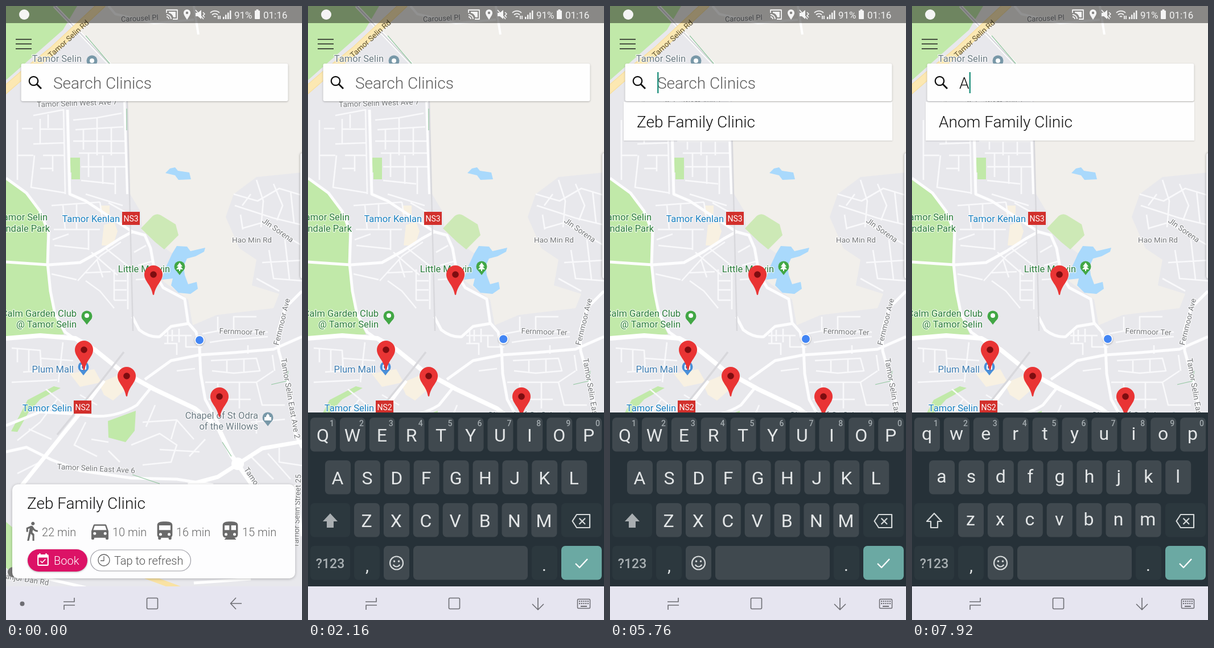
Recreate the animation shown at these times as an HTML page with a canvas. Size 520 by 1077 pixels, loop 8000 ms.

```html
<!DOCTYPE html>
<html lang="en">
<head>
<meta charset="utf-8">
<title>Clinic search</title>
<style>
html, body { margin: 0; width: 100%; height: 100%; overflow: hidden; background: #e8e8ec; }
canvas { display: block; width: 520px; height: 1077px; }
</style>
</head>
<body>
<canvas id="stage"></canvas>
<script>
const W = 520, H = 1077, LOOP = 8000, STEP = 80;
const canvas = document.getElementById('stage');
const dpr = window.devicePixelRatio || 1;
canvas.width = W * dpr;
canvas.height = H * dpr;
const c = canvas.getContext('2d');

const CLINICS = ['Zeb Family Clinic', 'Boka Clinic', 'Anom Family Clinic', 'Ono Peak Medical'];
const FOCUS = 600;
const EDITS = [
  [2960, 'A'], [3840, ''], [4240, 'Z'], [4560, 'Ze'], [4800, 'Zeb'],
  [5200, 'Ze'], [5400, 'Z'], [5600, ''], [6160, 'A'], [6480, 'An'],
  [6800, 'Ano'], [7040, 'Anom'], [7440, 'Ano'], [7680, 'An'], [7840, 'A']
];

// ---------- helpers ----------
function fill(d, color, rule) {
  c.fillStyle = color;
  c.fill(new Path2D(d), rule || 'nonzero');
}
function line(d, color, width) {
  c.strokeStyle = color;
  c.lineWidth = width;
  c.stroke(new Path2D(d));
}
function box(x, y, w, h, r, color) {
  c.beginPath();
  c.roundRect(x, y, w, h, r);
  c.fillStyle = color;
  c.fill();
}
function frame(x, y, w, h, r, color, width) {
  c.beginPath();
  c.roundRect(x, y, w, h, r);
  c.strokeStyle = color;
  c.lineWidth = width;
  c.stroke();
}
function disc(x, y, r, color) {
  c.beginPath();
  c.arc(x, y, r, 0, 7);
  c.fillStyle = color;
  c.fill();
}
function ring(x, y, r, color, width) {
  c.beginPath();
  c.arc(x, y, r, 0, 7);
  c.strokeStyle = color;
  c.lineWidth = width;
  c.stroke();
}
function text(s, x, y, size, color, opt = {}) {
  c.save();
  c.translate(x, y);
  c.rotate((opt.turn || 0) * Math.PI / 180);
  c.font = `${opt.weight || 400} ${size}px Roboto, sans-serif`;
  c.textAlign = opt.align || 'left';
  if (opt.halo) {
    c.strokeStyle = 'rgba(255,255,255,.75)';
    c.lineWidth = 2.5;
    c.strokeText(s, 0, 0);
  }
  c.fillStyle = color;
  c.fillText(s, 0, 0);
  c.restore();
}
const light = (s, x, y, size, color) => text(s, x, y, size, color, { weight: 300 });
function at(x, y, scale, draw) {
  c.save();
  c.translate(x, y);
  c.scale(scale, scale);
  draw();
  c.restore();
}
// 24-unit icon centred on x, y
const icon = (d, x, y, scale, color) =>
  at(x, y, scale, () => { c.translate(-12, -12); fill(d, color, 'evenodd'); });
function shadow(blur, dy, alpha, draw) {
  c.save();
  c.shadowColor = `rgba(0,0,0,${alpha})`;
  c.shadowBlur = blur * dpr;
  c.shadowOffsetY = dy * dpr;
  draw();
  c.restore();
}

// ---------- map ----------
const GREEN = '#c1e9a9', WATER = '#a9d9fc', CREAM = '#f8f1e2', RAIL = '#d8d8dc';

function land() {
  box(0, 0, W, H, 0, '#e8e8ec');
  fill('M85 0H520V292L440 300 400 330 386 370 410 425 440 445 432 490 480 505 470 530 370 542 328 560 320 515 275 482 300 440 280 425 240 395 236 360 218 330 213 168 185 104Z', '#f1efeb');
  fill('M0 0H125L100 42 0 130Z', GREEN);
  fill('M0 304L26 320 56 355 72 395 71 450 78 500 84 540 102 576 0 580Z', GREEN);
  fill('M237 390L258 368Q265 363 272 367L298 383 303 402 278 427 262 414Z', '#cde9b6');
  fill('M113 266H130V304H115V292H113ZM179 728L228 710 226 745 210 765 180 757Z', GREEN);
  fill('M38 691L84 667 96 670 60 690 40 712 20 747 9 746ZM0 905L12 915V995L0 985Z', GREEN);
  fill('M280 293L288 285 297 283 302 289 322 292 325 304 303 305 297 297Z', WATER);
  fill('M274 480L279 462 292 434 300 421 318 422 324 430 350 424 348 431 333 439 318 443 312 456 314 472 320 488 335 484 337 496 324 505 303 503 290 490 293 478Z', WATER);
  fill('M172 384L190 378 196 395 188 420 168 420ZM112 645L155 637 168 660 130 668ZM163 662L196 648 211 672 188 692 172 682ZM165 350H182V365H165Z', CREAM);
}

function streets() {
  const small = [
    'M48 192L101 182 104 330M60 198V242M60 216H100M48 242L103 240M74 190V214M65 262H102M82 262V290M50 262L44 318 105 328M20 200V305M20 262H48M60 285H82M28 215H47',
    'M118 200L160 196 203 188M122 217L206 212M118 237H210M160 196V262M136 217V252M185 212V262M128 258H212M145 258V300M170 262V312M132 282H210M132 306L190 312M192 282V330M140 330L205 350',
    'M80 350L165 344M100 350L104 392M84 392H165M124 348V392M145 392V428M85 420L145 426M165 344L170 378M180 345L210 362M82 410L110 400',
    'M126 482L166 438 202 414M150 432L196 472M138 468L184 466M160 445L170 476M176 426L214 456V532M190 462V516M190 482H212M190 498H212M190 516H212M140 482L165 500 190 530M225 432L246 420M232 455L256 448M228 480L262 478M80 470L124 480',
    'M400 330L442 342 480 320 520 332M402 350L470 372 520 384M440 305L452 342 448 388M470 312L486 350 476 376M415 390L450 380 520 420M412 366L416 392M500 325L506 380M430 330L415 350M450 450L520 446M462 428L470 478 520 482M490 410L498 480M440 478L480 500',
    'M278 578H326M284 570V592M292 568V588M304 566V590M278 592H300V612M316 578V598H345M345 575L372 570 460 572M372 570V545M400 572V545H440M358 590L384 586 460 580M425 595V610M300 640L332 636M360 622L440 618 446 640 400 644 362 640M388 620V642M418 618V643M350 660H440L470 640M372 662V690M410 660V706M440 660L450 700 490 700M356 690H430M468 612L472 640',
    'M10 600L60 604 62 640 30 642M20 600V625M40 602V640M62 618L118 622M100 590L92 660M10 660L90 656M70 672L118 712M90 690L60 730M130 682L160 700M140 730L120 770 160 790M150 760L180 765M40 742L80 760M20 762L60 730M220 770L270 750 300 770 290 800 240 805M240 730L300 726 330 760M262 700L246 738M300 726L290 760M270 778L340 782M322 790L350 760M60 800L20 820M180 780L200 800M430 730L490 725M440 750V720M430 790L470 830M460 785L500 830M480 775V800L520 806'
  ];
  small.forEach(d => line(d, '#f9f9fb', 2.6));
  const main = [
    'M0 302L36 328 60 360 75 398 73 452 78 500 86 540 104 572 132 592',
    'M0 449L75 454 130 450 166 430 200 408 222 396 244 402 254 425 262 470 276 494 314 514 320 556 334 572 340 600 342 645 350 690 380 745',
    'M222 545L234 568Q252 582 270 580L290 562 320 557M108 182L112 330 140 342 222 396',
    'M244 655L290 622 340 612 400 608 470 602 520 580M520 500L490 530 478 570 479 605 500 680 508 750 520 775',
    'M0 736L60 712 130 716Q185 728 230 700L256 668M0 782L36 774 80 796 130 815 220 828 300 830 364 840'
  ];
  main.forEach(d => line(d, '#fdfdfe', 5));
  line('M0 583L60 578 122 583 156 603 202 640 260 672 332 706 372 738 396 788 436 845', '#fff', 8);
  line('M408 803L450 776 520 764M408 803L372 826 320 840M172 657L130 714 22 848', '#fff', 7);
  disc(407, 803, 11, '#fff');
  line('M207 607L168 657 90 752', RAIL, 3.5);
  line('M208 168L213 330', '#fdfdfe', 4);
  line('M85 0L182 102 212 168', '#fff', 6);
  line('M85 0L182 102 213 168 217 330 223 570', RAIL, 2.5);
  line('M212 180V218M140 52L183 102M466 664L492 658 496 640M380 765L396 790M222 822L270 838', '#93c7a0', 1.2);
  line('M-5 150L32 118 82 78 170 -4', '#f7dfa0', 14);
  line('M-5 150L32 118 82 78 170 -4', '#fce8b2', 11.5);
  line('M180 0L192 14 260 30 330 24M330 0L338 50', '#fff', 4);
  line('M245 1000L305 1022', '#f9e2a3', 9);
  line('M70 1004L140 1020M330 1012L430 1005M508 840L520 930', '#fff', 5);
}

function badge(x, y, color) {
  disc(x, y, 9.5, color);
  fill(`M${x - 7} ${y + 6}L${x} ${y + 15} ${x + 7} ${y + 6}Z`, color);
}

function labels() {
  const road = '#75777a', park = '#2b7d3c', rail = '#1a80c0', place = '#6a7a82';
  const name = (s, x, y, color, align) => text(s, x, y, 16.5, color, { align, halo: 1 });
  const street = (s, x, y, turn, size = 13.5) =>
    text(s, x, y, size, road, { align: 'center', turn, halo: 1 });
  text('Tamor Selin Rd', 113, 61, 13.5, '#5d5132', { align: 'center', turn: -42 });
  street('Carousel Pl', 235, 26, -3, 13);
  street('Tamor Selin West Ave 7', 125, 175, -2);
  street('Hao Min Rd', 432, 415, 0);
  street('Jln Sorena', 475, 397, 35);
  street('Fernmoor Ter', 415, 576, 2);
  street('Fernmoor Ave', 489, 555, -76);
  street('Tamor Selin East Ave 2', 495, 689, 80, 14);
  street('Tamor Selin East Ave 6', 158, 816, 3);
  street('Tamor Selin East Ave 5', 456, 870, 56);
  street('Tamor Selin Street 25', 516, 886, -88);
  street('Tanjor Dan Rd', 33, 1010, 9);

  name('Tamor Selin', 133, 98, place, 'right');
  name('amor Selin', 73, 376, park, 'right');
  name('rndale Park', 77, 396, park, 'right');
  name('Tamor Kenlan', 200, 379, rail, 'right');
  name('Little Morvin', 288, 467, park, 'right');
  name('Calm Garden Club', 124, 545, park, 'right');
  name('@ Tamor Selin', 124, 564, park, 'right');
  name('Plum Mall', 119, 643, '#3e7db2', 'right');
  name('Tamor Selin', 116, 711, rail, 'right');
  name('Chapel of St Odra', 443, 724, place, 'right');
  name('of the Willows', 443, 743, place, 'right');

  [['NS3', 204, 361], ['NS2', 119, 692]].forEach(([s, x, y]) => {
    box(x, y, 31, 23, 0, '#d2302c');
    text(s, x + 15.5, y + 17, 14, '#fff', { align: 'center' });
  });

  badge(151, 96, '#7898a8');
  disc(151, 96, 4, '#fff');
  badge(305, 457, '#42a745');
  fill('M305 450L310 457H307L311 462H306V465H304V462H299L303 457H300Z', '#fff');
  badge(142, 544, '#42a745');
  disc(142, 543, 4, '#fff');
  badge(136, 633, '#4a90d9');
  frame(132, 630, 8, 7, 1, '#fff', 2);
  badge(460, 722, '#7898a8');
  fill('M454 727V721H457V719L460 715 463 719V721H466V727Z', '#fff');
  disc(12, 993, 9, '#777');
}

function pin(x, y) {
  at(x, y, 1, () => {
    fill('M-16 0A16 16 0 0 1 16 0C16 12 4 18 1.2 35Q0 37 -1.2 35C-4 18 -16 12 -16 0Z', '#e93434');
    disc(0, 0, 5.8, '#7d0d10');
  });
}

function map(t) {
  land();
  streets();
  labels();
  const x = 344 - 4 * Math.exp(-t / 1200), y = 584 + 2 * Math.exp(-t / 1000);
  shadow(3, 1, .3, () => disc(x, y, 8.7, '#fff'));
  disc(x, y, 7, '#4285f4');
  [[259, 471], [137, 603], [212, 649], [375, 685]].forEach(p => pin(...p));
  shadow(4, 0, .35, () => box(517, 258, 8, 220, 4, '#f4f4f6'));
}

// ---------- app chrome ----------
function statusBar() {
  box(0, 0, W, 30, 0, 'rgba(0,0,0,.43)');
  const ink = '#f4f4f4';
  disc(32, 15, 9, ink);
  line('M282 12V7H301V23H293M282 15A8 8 0 0 1 290 23M282 19A4 4 0 0 1 286 23', ink, 1.8);
  fill('M286 10H298V20H294Q292 13 286 12Z', ink);
  fill('M318 24C314 18 312 15 312 12A6 6 0 0 1 324 12C324 15 322 18 318 24Z', ink);
  disc(318, 12, 2.2, '#858483');
  fill('M333 12H337L343 7V23L337 18H333Z', ink);
  line('M333 7L347 23M346 11L349 14 346 17 349 20', ink, 1.7);
  line('M359 12A11 11 0 0 1 375 12M362 15.5A7 7 0 0 1 372 15.5M365 19A3 3 0 0 1 369 19M373 17V23M376 23V17', ink, 1.8);
  for (let i = 0; i < 4; i++) box(381 + i * 4, 19 - i * 3.7, 2.5, 4 + i * 3.7, 0, ink);
  text('91%', 401, 22, 17, ink);
  box(437, 8, 9, 15, 1, ink);
  box(439.5, 6, 4, 3, 0, ink);
  text('01:16', 452, 22, 17, ink);
}

const WALK = 'M13.5 5.5c1.1 0 2-.9 2-2s-.9-2-2-2-2 .9-2 2 .9 2 2 2zM9.8 8.9L7 23h2.1l1.8-8 2.1 2v6h2v-7.5l-2.1-2 .6-3C14.8 12 16.8 13 19 13v-2c-1.9 0-3.5-1-4.3-2.4l-1-1.6c-.4-.6-1-1-1.7-1-.3 0-.5.1-.8.1L6 8.3V13h2V9.6z';
const LAMPS = 'M6 15.5a1.5 1.5 0 1 0 3 0a1.5 1.5 0 1 0-3 0zM15 15.5a1.5 1.5 0 1 0 3 0a1.5 1.5 0 1 0-3 0z';
const CAR = 'M18.9 6C18.7 5.4 18.2 5 17.5 5h-11C5.8 5 5.3 5.4 5.1 6L3 12v8q0 1 1 1h1q1 0 1-1v-1h12v1q0 1 1 1h1q1 0 1-1v-8zM5 11l1.5-4.5h11L19 11zM5 14.5a1.5 1.5 0 1 0 3 0a1.5 1.5 0 1 0-3 0zM16 14.5a1.5 1.5 0 1 0 3 0a1.5 1.5 0 1 0-3 0z';
const BUS = 'M4 16q0 1.4 1 2.2V20q0 1 1 1h1q1 0 1-1v-1h8v1q0 1 1 1h1q1 0 1-1v-1.8q1-.8 1-2.2V6c0-3.5-3.6-4-8-4s-8 .5-8 4zM18 11H6V6h12z' + LAMPS;
const TRAIN = 'M12 2c-4.4 0-8 .5-8 4v9.5Q4 19 7.5 19L6 20.5v.5h12v-.5L16.5 19q3.5 0 3.5-3.5V6c0-3.5-3.6-4-8-4zM11 11H6V6h5zM18 11h-5V6h5z' + LAMPS;
const CALENDAR = 'M16.5 11L15.5 10l-4.9 4.9-2.1-2.1-1.1 1L10.6 17zM19 3h-1V1h-2v2H8V1H6v2H5Q3 3 3 5v14q0 2 2 2h14q2 0 2-2V5q0-2-2-2zm0 16H5V8h14z';

function card() {
  shadow(5, 1, .25, () => box(11, 839, 497, 165, 10, '#fdfdfe'));
  light(CLINICS[0], 37, 882, 28, '#111');
  [[WALK, 45, 22, 63], [CAR, 165, 10, 187], [BUS, 279, 16, 299], [TRAIN, 394, 15, 415]]
    .forEach(([d, x, min, tx]) => {
      icon(d, x, 921, d === WALK ? 1.55 : 1.67, '#6a6a6a');
      light(min + ' min', tx, 930, 20, '#666');
    });
  shadow(3, 1, .3, () => box(38, 953, 105, 39, 19.5, '#dc1266'));
  icon(CALENDAR, 65, 972, 1.1, '#fff');
  light('Book', 84, 980, 20, '#fff');
  box(148.5, 954, 176, 37, 18.5, '#fff');
  frame(148.5, 954, 176, 37, 18.5, '#9b9ba3', 1.2);
  ring(172, 972, 10, '#666', 1.3);
  line('M172 965V973H166', '#666', 1.3);
  light('Tap to refresh', 190, 980, 20, '#555');
}

function search(s, cursor, results) {
  line('M17 58.5H45M17 66.5H45M17 75H45', '#1d1d1d', 1.4);
  if (results.length) shadow(2, 1, .15, () => box(24, 168, 472, results.length * 69 - 1, 0, '#fefefe'));
  shadow(3, 1, .28, () => box(26.5, 101, 469, 66, 3, '#fefefe'));
  results.forEach((r, i) => {
    if (i) box(24, 167 + i * 69, 472, 1, 0, '#e7e7ea');
    light(r, 47, 213 + i * 69, 28, '#111');
  });
  ring(48.5, 131.5, 7.7, '#111', 2.3);
  line('M54 137L62 145', '#111', 2.8);
  light(s || 'Search Clinics', 83, 145, 28, s ? '#111' : '#5c5c5c');
  if (cursor) {
    c.font = '300 28px Roboto, sans-serif';
    box(83 + c.measureText(s).width, 116, 2.5, 37, 0, '#2a9583');
  }
}

function navBar(typing) {
  const ink = '#6d6d73';
  box(0, 1018, W, 59, 0, '#e6e5f0');
  line('M101 1045H120V1038M117 1045H120M121 1051H102V1059', ink, 1.6);
  frame(247.5, 1038.5, 19, 19, 2, ink, 1.6);
  if (typing) {
    line('M404 1038V1059M394 1049L404 1059 414 1049', ink, 1.6);
    frame(473.5, 1040.5, 22, 16, 1.5, ink, 1.5);
    for (let i = 0; i < 10; i++) box(476 + (i % 5) * 3.7, 1043 + (i > 4) * 4, 2.2, 2.2, 0, ink);
    box(479, 1052, 11, 2, 0, ink);
  } else {
    disc(28.5, 1048.5, 4, ink);
    line('M414 1048H395M404 1038L394.5 1048 404 1058', ink, 1.6);
  }
}

// ---------- keyboard ----------
const ROWS = [['qwertyuiop', 4, 722], ['asdfghjkl', 30, 797], ['zxcvbnm', 81, 872]];
const PITCH = 51.9, KEY = '#40494f', DARK = '#2c383e', INK = '#e3e6e7';

function keyboard(caps, pressed) {
  box(0, 713, W, 372, 0, '#263138');
  const key = (x, y, w, color) => box(x, y, w, 59.5, 7, color);
  let popup;
  ROWS.forEach(([letters, x0, y], row) => [...letters].forEach((ch, i) => {
    const x = x0 + i * PITCH;
    key(x, y, 45, KEY);
    text(caps ? ch.toUpperCase() : ch, x + 22, y + (caps ? 42 : 39), 32, INK, { align: 'center' });
    if (!row) text(String((i + 1) % 10), x + 38, 737, 14, '#a3abaf', { align: 'center', weight: 500 });
    if (pressed && ch === pressed.toLowerCase()) popup = [x, y];
  }));
  key(4, 872, 70, DARK);
  const arrow = 'M39 890L52 904H45V915H33V904H26Z';
  if (caps) fill(arrow, '#a9aeb1');
  else line(arrow, '#d5d9da', 2.2);
  key(445, 872, 71, DARK);
  line('M472 892H495V915H472L464.5 903.5ZM476.5 898.5L487 909M487 898.5L476.5 909', '#d5d9da', 2.2);

  key(4, 947, 70, DARK);
  text('?123', 39, 986, 23, '#a9b0b3', { align: 'center', weight: 500 });
  key(81, 947, 45, DARK);
  text(',', 104, 992, 30, INK, { align: 'center' });
  key(133, 947, 45, KEY);
  ring(155.5, 977, 11.5, '#d5d9da', 2.2);
  disc(151.5, 974, 1.8, '#d5d9da');
  disc(159.5, 974, 1.8, '#d5d9da');
  line('M149.5 980Q155.5 987 161.5 980', '#d5d9da', 2);
  key(185, 947, 201, KEY);
  key(393, 947, 45, DARK);
  text('.', 415, 991, 30, INK, { align: 'center' });
  key(445, 947, 71, '#6ba9a3');
  line('M470 978L477 985 491 970', '#fff', 2.4);

  if (popup) {
    const [x, y] = popup;
    shadow(4, 1, .3, () => box(x - 3, y - 91, 52, 151, 7, '#384248'));
    text(pressed, x + 22, y - 43, 34, '#fff', { align: 'center' });
  }
}

// ---------- timeline ----------
function stateAt(t) {
  let s = '', last = FOCUS, results = [], pressed = null;
  for (const [time, next] of EDITS) {
    if (time > t) break;
    const grew = next.length > s.length;
    if (grew) results = CLINICS.filter(n => n.toLowerCase().includes(next.toLowerCase()));
    pressed = grew && t - time < 160 ? next.slice(-1) : null;
    s = next;
    last = time;
  }
  const cursor = t >= FOCUS && (t - last) % 1000 < 500;
  return { s, results, pressed, cursor };
}

function draw(t) {
  c.setTransform(dpr, 0, 0, dpr, 0, 0);
  c.lineJoin = 'round';
  const { s, results, pressed, cursor } = stateAt(t);
  const x = Math.min(1, Math.max(0, (t - 760) / 290));
  const shown = 1 - (1 - x) ** 2;
  map(t);
  card();
  search(s, cursor, results);
  statusBar();
  if (shown < 1) navBar(shown > 0);
  if (shown > 0) {
    c.save();
    c.globalAlpha = shown ** 1.4;
    c.translate(0, 190 * (1 - shown));
    keyboard(!s, pressed);
    c.restore();
  }
  if (shown === 1) navBar(true);
}

let drawn = -1;
function tick() {
  const t = Math.floor(performance.now() % LOOP / STEP) * STEP;
  if (t !== drawn) draw(drawn = t);
  requestAnimationFrame(tick);
}
tick();
</script>
</body>
</html>
```
